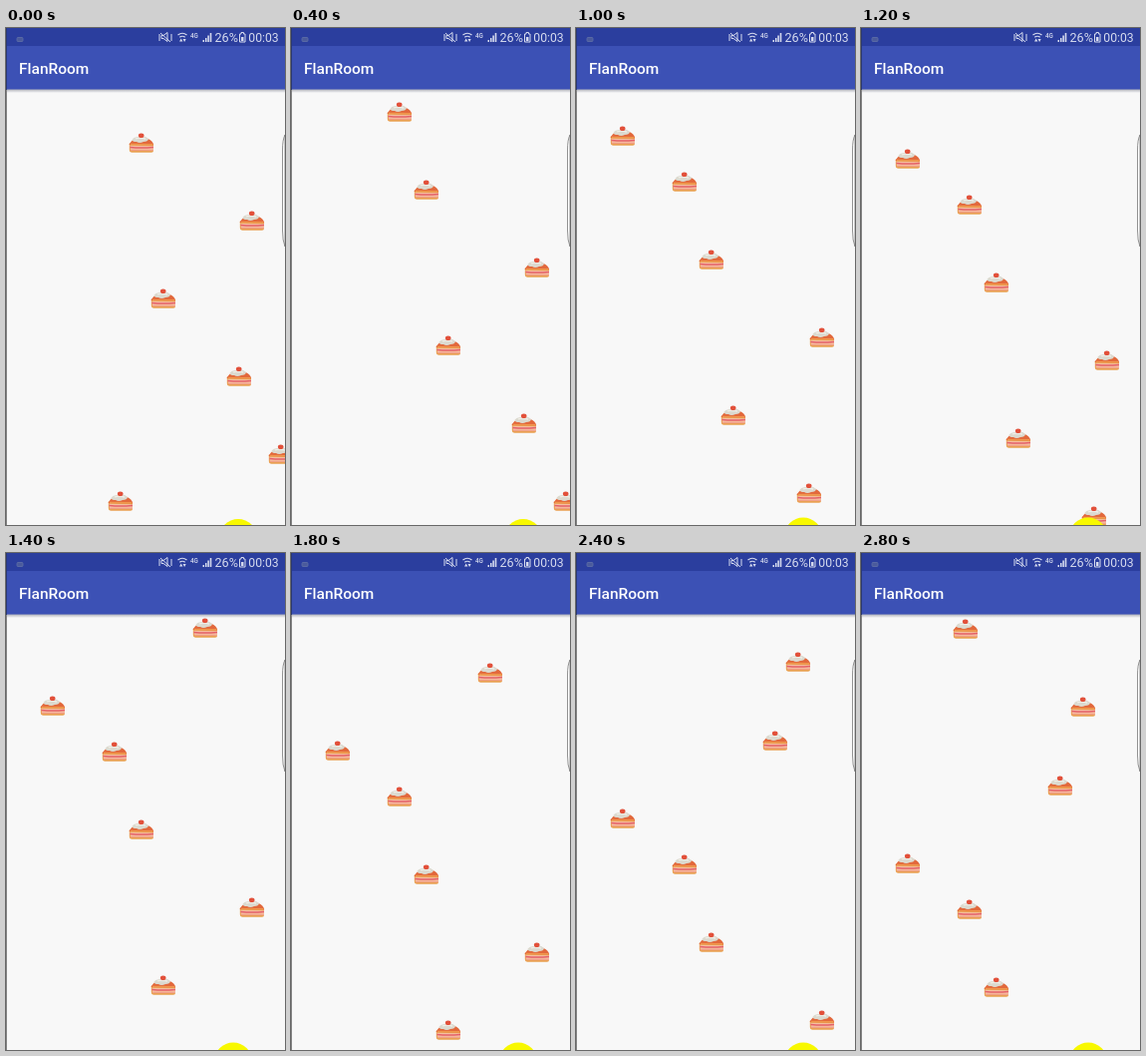
Recreate the animation shown at these times as an HTML page. Size 280 by 498 pixels, loop 3 s.

```html
<!DOCTYPE html>
<html lang="en">
<head>
<meta charset="utf-8">
<title>Falling cakes</title>
<style>
  html, body { margin: 0; width: 100%; height: 100%; overflow: hidden; background: #f8f8f8; }
  svg { display: block; width: 100vw; height: 100vh; }
  text { font-family: Roboto, sans-serif; }
</style>
</head>
<body>
<svg viewBox="0 0 280 498">
  <defs>
    <linearGradient id="shade" x2="0" y2="1">
      <stop offset="0" stop-color="#a8a9b2"/>
      <stop offset="1" stop-color="#f8f8f8"/>
    </linearGradient>
    <!-- Slice of cake, centred on 0,0 -->
    <g id="cake">
      <path d="M-12.2 .5 L12 1 V8 Q12 9.7 10 9.7 H-9.5 Q-12.2 9.7 -12.2 7Z" fill="#e9a052"/>
      <path d="M-11.4 2.8 L12 3.2 V8 L-11 7.6Z" fill="#f6bfa0"/>
      <path d="M-11.6 4.4 Q0 5.6 12 4.4" fill="none" stroke="#e4606a" stroke-width="1.5"/>
      <path d="M-11 7.3 H11.8" stroke="#f09a86"/>
      <path d="M-12.4 2 Q-11.5 -1.5 -6 -4.6 L6 -4.2 Q11.5 -1.8 12.2 2.2Z" fill="#e2683c"/>
      <path d="M-11 1.4 L11.5 1.7" stroke="#f0964c" stroke-width="1.2"/>
      <path d="M-9.5 -3 Q-8.5 -5.5 -4 -6 Q4 -7.5 7 -4 Q6.5 -1.2 2 -1 Q-2 .8 -5 -1 Q-9 -.8 -9.5 -3Z" fill="#dcdad0"/>
      <path d="M-6 -4 Q-1 -5.8 4 -3.8" fill="none" stroke="#f0efe8" stroke-width="1.3"/>
      <ellipse cx="-.3" cy="-7.2" rx="2.8" ry="2.3" fill="#e2503a"/>
    </g>
  </defs>

  <rect width="280" height="498" fill="#f8f8f8"/>
  <rect y="61" width="280" height="4" fill="url(#shade)"/>
  <g id="cakes"></g>
  <circle id="dot" r="19" fill="#f8f800"/>
  <path d="M280 107 Q277.5 112 277.5 122 V203 Q277.5 213 280 219Z" fill="#fff" stroke="#777" stroke-width=".8"/>

  <rect width="280" height="18.5" fill="#2b3e9e"/>
  <rect y="18" width="280" height="43.5" fill="#3c51b5"/>
  <path d="M.5 0 V62" stroke="#2a3872"/>
  <path d="M.5 62 V498" stroke="#858585"/>
  <text x="13" y="46" font-size="15.5" font-weight="500" fill="#fff">FlanRoom</text>

  <g fill="#d5daee">
    <rect x="11" y="9.5" width="6" height="4" rx="1" fill="#4a5a9c" stroke="#6172a8" stroke-width=".8"/>
    <g fill="none" stroke="#d5daee">
      <path d="M154 6 V13 M156 7.5 h2 l4 -3 v9 l-4 -3 h-2Z M155 5 L165 14 M166 6 V13"/>
      <path d="M172.5 7 Q177 3.5 181.5 7 M174.3 9.3 Q177 7.2 179.7 9.3" stroke-width="1.2"/>
    </g>
    <path d="M174 13.5 l1.7 -3 1.7 3Z M177.5 11 h3.2 l-1.6 3Z"/>
    <text x="185" y="10" font-size="6.3" font-weight="500">4G</text>
    <path d="M197.5 12 h1.5 v2 h-1.5Z M200 10 h1.5 v4 h-1.5Z M202.3 7.5 h1.6 v6.5 h-1.6Z M204.7 5 h1.6 v9 h-1.6Z"/>
    <text x="209.5" y="14" font-size="12.6">26%</text>
    <path d="M234.5 6 h1.5 v-1.5 h2.5 v1.5 h1.5 v8 h-5.5Z" fill="none" stroke="#d5daee"/>
    <path d="M236 9 h2.5 v4 h-2.5Z"/>
    <text x="243.3" y="14" font-size="12.2">00:03</text>
  </g>
</svg>
<script>
  const LOOP = 3000, STEP = 200, ENTRY_Y = 70;
  // Each cake: x and height at the start of the loop
  const cakes = [
    [115, 474], [276, 427], [234, 349], [158, 271], [247, 193], [136, 115],
    [109, 37], [47, -9], [200, -87], [223, -166], [105, -244]
  ].map(([x, y]) => {
    const node = document.createElementNS("http://www.w3.org/2000/svg", "use");
    node.setAttribute("href", "#cake");
    document.getElementById("cakes").append(node);
    return { x, y, node };
  });
  const dot = document.getElementById("dot");

  // The fall slows slightly after the first second
  const fallen = t => 0.117 * Math.min(t, 1000) + 0.1128 * Math.max(t - 1000, 0);

  function draw() {
    const t = Math.floor(performance.now() % LOOP / STEP) * STEP;
    for (const { x, y, node } of cakes) {
      const height = Math.round(y + fallen(t));
      node.setAttribute("transform", `translate(${x} ${height})`);
      node.setAttribute("visibility", height < ENTRY_Y ? "hidden" : "visible");
    }
    const shift = Math.min(Math.max((t - 400) / 600, 0), 1);
    dot.setAttribute("cx", 233 - 5 * shift);
    dot.setAttribute("cy", 511 - 1.5 * shift);
    requestAnimationFrame(draw);
  }
  draw();
</script>
</body>
</html>
```
